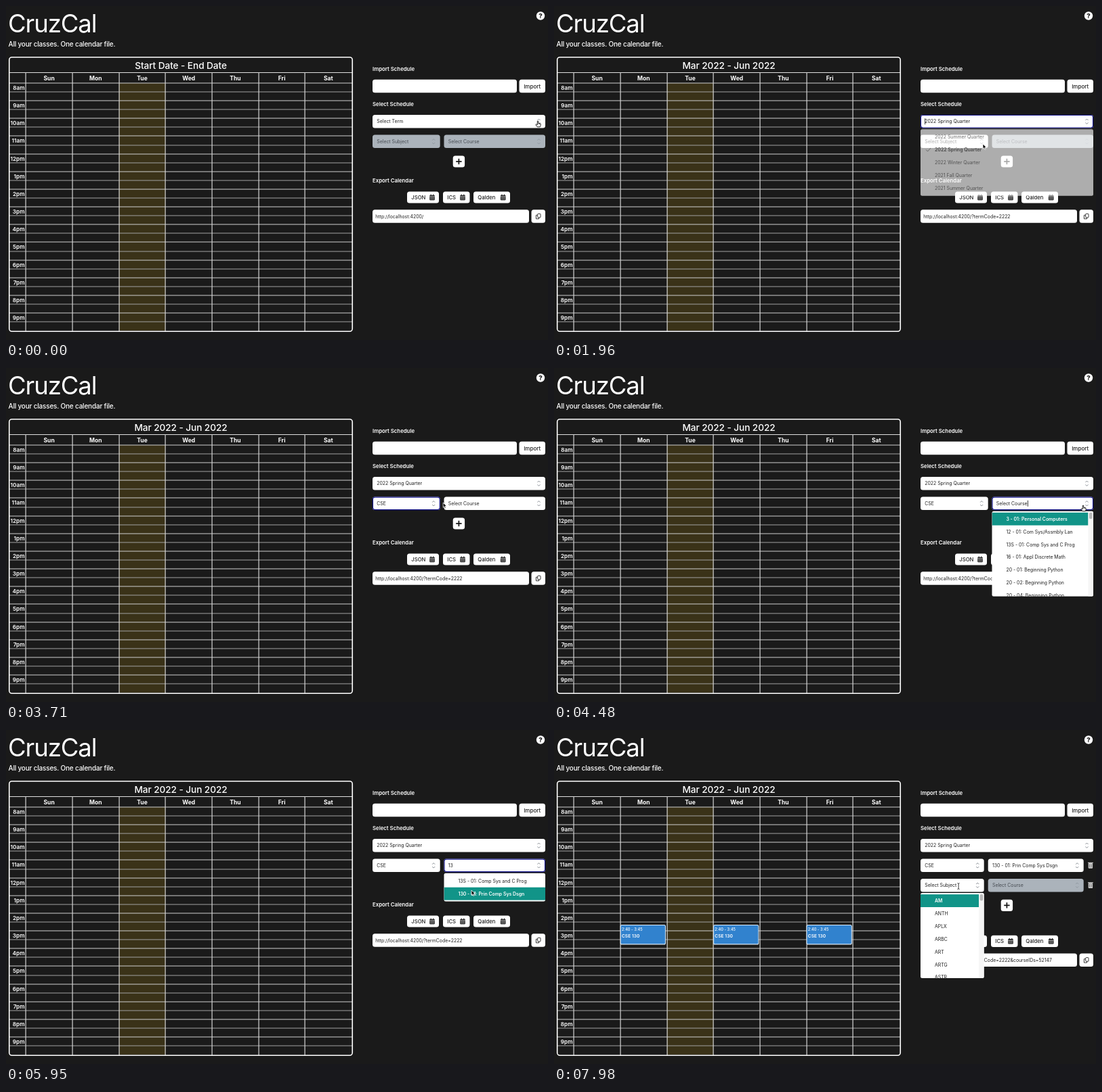
Animation of 800 by 494 pixels, one loop 8 s. Source, as an HTML page with a canvas:

```html
<!DOCTYPE html>
<html lang="en">
<head>
<meta charset="utf-8">
<title>Class calendar</title>
<style>
html, body { margin: 0; width: 100%; height: 100%; overflow: hidden; background: #1a1a1a; }
canvas { display: block; }
</style>
</head>
<body>
<canvas id="stage" width="800" height="494"></canvas>
<script>
const ctx = document.getElementById('stage').getContext('2d');
const LOOP = 8000;
const BG = '#1a1a1a', INK = '#1f1f1f', TEAL = '#119488';
const FIELD_H = 19.5, ROW_H = 18.9, LIST_H = 126;

// Moments at which the user acts
const T = {
  termOpen: 210, termPick: 1890,
  subjOpen: 2350, keyC: 2750, keyS: 2870, subjPick: 3380,
  courseOpen: 4290, key1: 4950, key3: 5120, coursePick: 6090,
  add: 6510, nextOpen: 7810
};

const DAYS = ['Sun', 'Mon', 'Tue', 'Wed', 'Thu', 'Fri', 'Sat'];
const TERMS = ['2022 Summer', '2022 Spring', '2022 Winter', '2021 Fall', '2021 Summer'].map(s => s + ' Quarter');
const SUBJECTS = 'AM ANTH APLX ARBC ART ARTG ASTR BIOC CHEM CHIN CLNI CMPM CRES CRWN CSE CSP'.split(' ');
const COURSES = [
  '3 - 01: Personal Computers', '12 - 01: Com Sys/Assmbly Lan', '13S - 01: Comp Sys and C Prog',
  '16 - 01: Appl Discrete Math', '20 - 01: Beginning Python', '20 - 02: Beginning Python',
  '20 - 04: Beginning Python', '130 - 01: Prin Comp Sys Dsgn'
];

// time, x, y, pointer shape until the next entry
const POINTER = [
  [0, 785, 170, 'hand'], [1050, 785, 170, 'hand'], [1180, 768, 176, 'arrow'],
  [1750, 633, 204, 'arrow'], [2050, 633, 204, 'arrow'], [2250, 631, 199, 'hand'],
  [2700, 631, 199, ''], [3500, 631, 199, 'hand'], [3650, 640, 199, 'arrow'],
  [4180, 781, 203, 'hand'], [4900, 781, 203, ''], [5380, 781, 203, 'hand'],
  [5480, 770, 208, 'arrow'], [5880, 687, 237, 'arrow'], [6130, 687, 237, 'arrow'],
  [6400, 658, 230, 'hand'], [T.add, 658, 230, 'arrow'], [6950, 658, 230, 'arrow'],
  [7250, 625, 231, 'hand'], [7420, 612, 231, 'ibeam'], [7680, 597, 231, 'ibeam'], [LOOP, 597, 231, 'ibeam']
];

const clamp = v => Math.max(0, Math.min(1, v));
const colX = i => 29.2 + i * 68.7;

function pointerAt(t) {
  let i = 0;
  while (i < POINTER.length - 2 && POINTER[i + 1][0] <= t) i++;
  const a = POINTER[i], b = POINTER[i + 1];
  const k = clamp((t - a[0]) / (b[0] - a[0]));
  const e = k * k * (3 - 2 * k);
  return { x: a[1] + (b[1] - a[1]) * e, y: a[2] + (b[2] - a[2]) * e, kind: a[3] };
}

// y is the middle of the capitals
function text(s, x, y, size, { color = '#fff', weight = 400, align = 'left', gap = 0 } = {}) {
  ctx.font = `${weight} ${size}px Inter, "Open Sans", sans-serif`;
  ctx.letterSpacing = gap + 'px';
  ctx.textAlign = align;
  ctx.fillStyle = color;
  ctx.fillText(s, x, y + size * 0.363);
  return ctx.measureText(s).width;
}

function box(x, y, w, h, fill, r = 3.5, stroke, lw = 1) {
  ctx.beginPath();
  ctx.roundRect(x, y, w, h, r);
  if (fill) { ctx.fillStyle = fill; ctx.fill(); }
  if (stroke) { ctx.strokeStyle = stroke; ctx.lineWidth = lw; ctx.stroke(); }
}

function rect(x, y, w, h, fill) {
  ctx.fillStyle = fill;
  ctx.fillRect(x, y, w, h);
}

function path(points, { fill, stroke, lw = 1, close = false }) {
  ctx.beginPath();
  points.forEach(([x, y], i) => i ? ctx.lineTo(x, y) : ctx.moveTo(x, y));
  if (close) ctx.closePath();
  if (fill) { ctx.fillStyle = fill; ctx.fill(); }
  if (stroke) { ctx.strokeStyle = stroke; ctx.lineWidth = lw; ctx.stroke(); }
}

function drawHeader() {
  text('CruzCal', 3, 26, 36.5, { gap: -1.1 });
  text('All your classes. One calendar file.', 3.5, 56, 10, { weight: 500, gap: -0.2 });
  ctx.beginPath();
  ctx.arc(789, 14.5, 6.2, 0, Math.PI * 2);
  ctx.fillStyle = '#fff';
  ctx.fill();
  text('?', 789, 14.6, 9.5, { color: BG, weight: 800, align: 'center' });
}

function drawCalendar(t) {
  const rowH = 13.08, top = 114;
  rect(colX(2), top, 68.7, 366, '#3a3218');
  for (let i = 0; i < 28; i++) {
    const y = Math.round(top + i * rowH);
    rect(5, y - 0.5, 506, 1, i % 2 ? '#a2a2a2' : '#cfcfcf');
    if (i % 2 === 0) {
      const h = 8 + i / 2;
      text((h > 12 ? h - 12 : h) + (h < 12 ? 'am' : 'pm'), 27.5, y + 7.2, 8.2, { weight: 600, align: 'right' });
    }
  }
  rect(5, 98, 506, 1, '#e0e0e0');
  DAYS.forEach((d, i) => {
    rect(Math.round(colX(i)) - 0.5, 98, 1.2, 383, '#d4d4d4');
    text(d, colX(i) + 34.4, 106.5, 8.6, { weight: 700, align: 'center' });
  });
  box(4.75, 75.75, 506.5, 405.5, null, 4, '#fff', 1.6);
  const range = t < T.termPick ? 'Start Date - End Date' : 'Mar 2022 - Jun 2022';
  text(range, 258, 88, 13.7, { weight: 500, align: 'center', gap: -0.1 });
  if (t >= T.coursePick) [1, 3, 5].forEach(drawEvent);
}

function drawEvent(day) {
  const x = colX(day);
  box(x + 0.3, 288.5, 66.3, 28.4, '#3182ce', 2, '#d8e8f6', 1.1);
  text('2:40 - 3:45', x + 2, 294.8, 5.7, { weight: 500 });
  text('CSE 130', x + 2, 304.3, 6.7, { weight: 600 });
}

function chevrons(x, y, color) {
  for (const s of [-1, 1])
    path([[x - 2, y + s * 1.7], [x, y + s * 3.7], [x + 2, y + s * 1.7]], { stroke: color, lw: 0.8 });
}

function select(x, y, w, label, { disabled, focus, caret, atStart } = {}) {
  box(x, y, w, FIELD_H, disabled ? '#abb3bb' : '#fff');
  if (focus) box(x + 0.5, y + 0.5, w - 1, FIELD_H - 1, null, 3, '#15158c', 1.1);
  const mid = y + FIELD_H / 2;
  const tw = text(label, x + 6.3, mid, 6.9, { color: disabled ? '#454a50' : INK });
  if (caret) rect(x + 6.3 + (atStart ? 0 : tw + 0.4), mid - 4.5, 0.8, 9, '#111');
  chevrons(x + w - 9.5, mid, disabled ? '#8a929b' : '#6b727a');
}

function menu(t, x, y, w, items, open, close, picked, ptr) {
  const alpha = t < close ? clamp((t - open) / 130) : 1 - clamp((t - close) / 200);
  if (t < open || alpha <= 0) return;
  const full = items.length * ROW_H + 4;
  const h = Math.min(full, LIST_H);
  const scroll = full > LIST_H;
  const rowW = w - (scroll ? 7.5 : 0);
  const over = ptr.kind && ptr.x > x && ptr.x < x + w && ptr.y > y + 2 && ptr.y < y + h;
  const active = t >= close ? -1 : over ? Math.floor((ptr.y - y - 2) / ROW_H) : 0;
  ctx.save();
  ctx.globalAlpha = alpha;
  box(x, y, w, h, '#fff', 2.5);
  ctx.clip();
  items.forEach((s, i) => {
    const ry = y + 2 + i * ROW_H;
    if (ry > y + h) return;
    const chosen = t >= close && s === picked;
    if (i === active) rect(x, ry, rowW, ROW_H, TEAL);
    text(s, x + 21, ry + ROW_H / 2, 6.9, {
      color: i === active ? '#fff' : INK, weight: chosen ? 700 : i === active ? 600 : 400
    });
    if (chosen) {
      const cy = ry + ROW_H / 2;
      path([[x + 8, cy], [x + 10.5, cy + 2.5], [x + 15, cy - 2.5]], { stroke: '#444', lw: 1 });
    }
  });
  if (scroll) {
    rect(x + rowW, y, 7.5, h, '#f6f6f6');
    box(x + rowW + 1.5, y + 2, 4.5, 9.5, '#b9b9b9', 2);
  }
  ctx.restore();
}

function trash(y) {
  box(788.7, y - 3.2, 6.4, 7.8, '#c9c9c9', 1.2);
  rect(788, y - 4.4, 7.8, 1.2, '#c9c9c9');
  for (const x of [790.3, 792.8]) rect(x, y - 1.6, 0.8, 4.6, '#666');
}

function calendarIcon(x, y) {
  box(x - 3.8, y - 3.2, 7.6, 7.4, '#222', 1);
  rect(x - 2.4, y - 4.4, 1.2, 2, '#222');
  rect(x + 1.2, y - 4.4, 1.2, 2, '#222');
  rect(x - 3.8, y - 1.5, 7.6, 0.7, '#fff');
  for (let i = 0; i < 6; i++)
    rect(x - 2.6 + (i % 3) * 2, y + 0.1 + Math.floor(i / 3) * 1.9, 1.1, 1, '#ddd');
}

function exportButton(x, w, label, iconX, y) {
  box(x, y - 8.6, w, 17.2, '#fff');
  text(label, x + 6.3, y, 7.7, { color: INK, weight: 500 });
  calendarIcon(iconX, y);
}

function drawExport(t, dy) {
  box(659.7, 221.4 + dy, 17.4, 17.2, '#fff');
  rect(664.2, 229.2 + dy, 8.4, 1.7, '#111');
  rect(667.55, 225.8 + dy, 1.7, 8.4, '#111');
  text('Export Calendar', 541, 258 + dy, 7.8, { weight: 600 });
  exportButton(592, 47, 'JSON', 629, 283 + dy);
  exportButton(645, 39.5, 'ICS', 674, 283 + dy);
  exportButton(690, 54, 'Qalden', 733.7, 283 + dy);
  box(541, 301.3 + dy, 231, FIELD_H, '#fff');
  let url = 'http://localhost:4200/';
  if (t >= T.termPick) url += '?termCode=2222';
  if (t >= T.coursePick) url += '&courseIDs=52147';
  text(url, 545.3, 311 + dy, 6.9, { color: INK });
  box(775.5, 301.3 + dy, 20.5, FIELD_H, '#fff');
  box(784.7, 307.3 + dy, 4.3, 5.6, '#fff', 0.8, '#222', 0.9);
  path([[784.6, 309.3 + dy], [782.4, 309.3 + dy], [782.4, 314.8 + dy], [786.6, 314.8 + dy], [786.6, 313 + dy]],
    { stroke: '#222', lw: 0.9 });
}

function drawForm(t, ptr) {
  const two = t >= T.add;
  const subjW = two ? 93.7 : 99.7;
  const courseX = two ? 640.7 : 646.5, courseW = two ? 141 : 149.5;
  const inside = (a, b) => t >= a && t < b;

  text('Import Schedule', 541, 92.8, 7.8, { weight: 600 });
  box(541, 108.8, 213, FIELD_H, '#fff');
  box(757.5, 108.8, 38.5, FIELD_H, '#fff');
  text('Import', 776.7, 118.7, 8, { color: INK, weight: 500, align: 'center' });
  text('Select Schedule', 541, 145, 7.8, { weight: 600 });

  const termFocus = inside(T.termOpen + 100, T.subjOpen - 50);
  select(541, 161, 255, t < T.termPick ? 'Select Term' : TERMS[1],
    { focus: termFocus, caret: termFocus, atStart: t >= T.termPick });

  const typed = t < T.keyC ? '' : t < T.keyS ? 'C' : 'CS';
  const subjFocus = inside(T.subjOpen + 100, T.courseOpen - 50);
  select(541, 190.6, subjW, t >= T.subjPick ? 'CSE' : typed || 'Select Subject', {
    disabled: t < T.termPick, focus: subjFocus, caret: subjFocus && t < T.subjPick
  });

  const num = t < T.key1 ? '' : t < T.key3 ? '1' : '13';
  const courseFocus = inside(T.courseOpen + 100, T.add - 50);
  select(courseX, 190.6, courseW, t >= T.coursePick ? COURSES[7] : num || 'Select Course', {
    disabled: t < T.subjPick, focus: courseFocus, caret: courseFocus && t < T.key1 + 400
  });

  if (two) {
    select(541, 219.9, subjW, 'Select Subject');
    select(courseX, 219.9, courseW, 'Select Course', { disabled: true });
    trash(200.2);
    trash(229.5);
  }
  drawExport(t, two ? 29.3 : 0);

  const starting = (list, s) => list.filter(v => v.startsWith(s));
  menu(t, 541, 182.2, 255, TERMS, T.termOpen, T.termPick, TERMS[1], ptr);
  menu(t, 541, 211.8, 99.7, starting(SUBJECTS, typed), T.subjOpen, T.subjPick, 'CSE', ptr);
  menu(t, 646.5, 211.8, 149.5, starting(COURSES, num), T.courseOpen, T.coursePick, COURSES[7], ptr);
  menu(t, 541, 241.1, 93.7, SUBJECTS, T.nextOpen, LOOP + 1, '', ptr);
}

function drawPointer({ x, y, kind }) {
  if (!kind) return;
  ctx.save();
  ctx.translate(x, y);
  ctx.lineJoin = 'round';
  if (kind === 'arrow') {
    path([[0, 0], [0, 7.2], [1.7, 5.7], [2.8, 8.3], [4.1, 7.8], [3, 5.2], [5.2, 5.1]],
      { fill: '#000', stroke: '#fff', lw: 0.8, close: true });
  } else if (kind === 'hand') {
    path([[-0.7, 0.3], [0.7, 0.3], [0.9, 3.2], [4, 4], [4.2, 6.2], [3.3, 8.8], [-0.8, 8.8], [-3.2, 5.5], [-2.3, 4.7], [-0.7, 5.9]],
      { fill: '#fff', stroke: '#111', lw: 0.9, close: true });
    path([[0.9, 3.2], [0.9, 5]], { stroke: '#111', lw: 0.6 });
    path([[2.4, 3.7], [2.4, 5.2]], { stroke: '#111', lw: 0.6 });
  } else {
    rect(-0.4, -4, 0.9, 8, '#222');
    for (const s of [-1, 1])
      path([[-1.6, s * 4.6], [0, s * 3.8], [1.6, s * 4.6]], { stroke: '#222', lw: 0.8 });
  }
  ctx.restore();
}

function frame(now) {
  const t = now % LOOP;
  const ptr = pointerAt(t);
  rect(0, 0, 800, 494, BG);
  drawHeader();
  drawCalendar(t);
  drawForm(t, ptr);
  drawPointer(ptr);
  requestAnimationFrame(frame);
}
requestAnimationFrame(frame);
</script>
</body>
</html>
```
